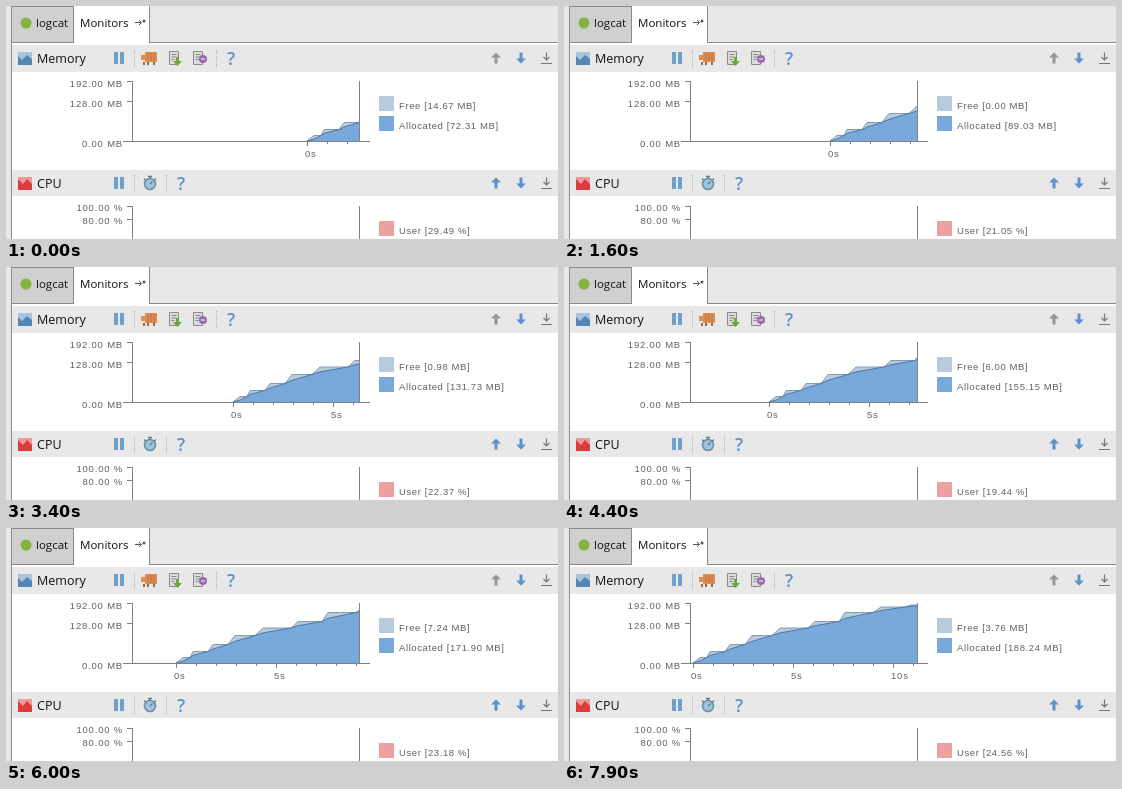
Animation, 552 px wide and 233 px high, one loop 8 s. Source, as an HTML page:

```html
<!DOCTYPE html>
<html lang="en">
<head>
<meta charset="utf-8">
<title>Monitors</title>
<style>
  html, body { margin: 0; width: 100%; height: 100%; overflow: hidden; background: #fff; }
  svg { display: block; width: 552px; height: 233px; }
  .ui { font-family: "Open Sans", "Noto Sans", sans-serif; fill: #111; }
  .tab { font-size: 11.5px; }
  .title { font-size: 12.5px; }
  .small { font: 9.5px "Liberation Sans", Arial, sans-serif; letter-spacing: .8px; fill: #606060; }
  .legend { letter-spacing: .6px; }
  .end { text-anchor: end; }
  .help { font: 600 18px "Open Sans", sans-serif; fill: #5b90c6; text-anchor: middle; }
  .line { stroke: #808080; fill: none; shape-rendering: crispEdges; }
  .divider { stroke: #b0b0b0; stroke-dasharray: 1 1; }
</style>
</head>
<body>
<svg viewBox="0 0 552 233">
  <defs>
    <clipPath id="plot"><rect x="126" y="70" width="227.5" height="66"/></clipPath>
    <g id="pause" fill="#6fa0cb"><rect width="4" height="12"/><rect x="6" width="4" height="12"/></g>
    <path id="arrow" d="M0-5.5L5-.5H1.5V5.5H-1.5V-.5H-5Z"/>
    <path id="save" d="M0-5.5V2M-3-1L0 2L3-1M-5.5 5.5H5.5" fill="none" stroke="#777" stroke-width="1.2"/>
    <g id="sheet"><path d="M0 0H9V13H0Z" fill="#dcdcdc" stroke="#8a8a8a"/><path d="M2 3H7M2 5.5H7M2 8H5" stroke="#888"/></g>
  </defs>

  <rect width="552" height="36" fill="#e8e8e8"/>
  <rect width="5" height="233" fill="#e8e8e8"/>
  <rect x="6" y="1" width="61" height="35" fill="#d0d0d0"/>
  <rect x="68" width="75" height="38" fill="#fff"/>
  <path class="line" d="M5.5 0V233M5 .5H67M5 36.5H67.5V0M143.5 0V36.5H552" style="stroke:#8a8a8a"/>
  <circle cx="20" cy="17" r="5.5" fill="#84b340"/>
  <text class="ui tab" x="30" y="21">logcat</text>
  <text class="ui tab" x="74" y="21">Monitors</text>
  <path d="M129 16.5H135M133 14L135.5 16.5L133 19" fill="none" stroke="#555"/>
  <circle cx="138" cy="15" r="1.5" fill="#555"/>

  <g fill="#e8e8e8"><rect x="6" y="39" width="546" height="27"/><rect x="6" y="164" width="546" height="26"/></g>
  <path class="line divider" d="M128.5 44V62M210.5 44V62M128.5 169V187M160.5 169V187"/>

  <rect x="12" y="46" width="14" height="13" fill="#a9c4dc"/>
  <path d="M12 50L16 54L21 49L26 53V59H12Z" fill="#5486b3"/>
  <rect x="12" y="171" width="14" height="13" fill="#ef9a9a"/>
  <path d="M12 173L17 178L21 173L26 178V184H12Z" fill="#dc3c3c"/>
  <text class="ui title" x="31" y="57">Memory</text>
  <text class="ui title" x="31" y="182">CPU</text>
  <use href="#pause" x="108" y="46"/>
  <use href="#pause" x="108" y="171"/>

  <path d="M135 49H139V46H151V56H139V54H135Z" fill="#df8d50"/>
  <path d="M142 47V55M145 47V55M148 47V55" stroke="#b9713c"/>
  <path d="M138 56V59M142 56V59M148 56V59" stroke="#9a6a45" stroke-width="2"/>
  <use href="#sheet" x="163.5" y="45.5"/>
  <path d="M170 51H173V55H176L171.5 60L167 55H170Z" fill="#69a83c"/>
  <use href="#sheet" x="187.5" y="45.5"/>
  <circle cx="197" cy="53" r="4" fill="#9b69ab"/><path d="M195 53H199" stroke="#fff"/>
  <text class="help" x="225" y="58.5">?</text>
  <text class="help" x="175" y="183.5">?</text>
  <circle cx="144" cy="178" r="5.5" fill="#9cc4de" stroke="#71909f" stroke-width="1.6"/>
  <path d="M142 170.5H146M144 170V173M138 172.5L140 174.5M150 172.5L148 174.5M144 178L146.5 175.5" stroke="#62798a" stroke-width="1.3"/>

  <g fill="#5b92cc">
    <use href="#arrow" x="490" y="52" fill="#969696"/>
    <use href="#arrow" transform="translate(515 52) scale(1 -1)"/>
    <use href="#arrow" x="490" y="177"/>
    <use href="#arrow" transform="translate(515 177) scale(1 -1)"/>
  </g>
  <use href="#save" x="540.5" y="52"/>
  <use href="#save" x="540.5" y="177"/>

  <g class="small end">
    <text x="117" y="81">192.00 MB</text>
    <text x="117" y="101">128.00 MB</text>
    <text x="117" y="141">0.00 MB</text>
    <text x="117" y="205">100.00 %</text>
    <text x="117" y="218">80.00 %</text>
  </g>
  <g clip-path="url(#plot)">
    <g id="series">
      <path id="total" fill="#b8cbdc"/>
      <path id="used" fill="#78a9da"/>
      <path id="totalLine" fill="none" stroke="#7f9bb5"/>
      <path id="usedLine" fill="none" stroke="#4f779f"/>
    </g>
  </g>
  <path class="line" d="M121 75.5H126.5V135M121 95.5H126M117 135.5H364M353.5 75V135M121 200.5H126.5V233M121 213.5H126M353.5 200V233"/>
  <path id="ticks" class="line"/>
  <g id="seconds" class="small"></g>

  <rect x="373" y="90" width="15" height="15" fill="#b8cbdc"/>
  <rect x="373" y="110" width="15" height="15" fill="#78a9da"/>
  <rect x="373" y="215" width="15" height="15" fill="#eca0a0"/>
  <g class="small legend">
    <text id="free" x="393" y="103"></text>
    <text id="allocated" x="393" y="123"></text>
    <text id="user" x="393" y="228"></text>
  </g>
</svg>
<script>
const LOOP = 8000, RIGHT = 353, BASE = 135;
const $ = id => document.getElementById(id);

// Plateaus of the heap: start, end and height in pixels.
const plateaus = [
  [7, 14, 5.5], [17, 32, 11.5], [37, 52, 18.5], [59, 79, 27.5], [87, 115, 35],
  [122, 146, 41.5], [152, 180, 50.5], [188, 212, 56], [218, 230, 58]
];
// Readings: second, free MB, allocated MB.
const memory = [
  [0, 14.67, 72.31], [.8, 0, 89.03], [1.7, 0, 121.57], [2.6, .98, 131.73],
  [3.6, 6, 155.15], [4.5, 0, 163.08], [5.4, 7.24, 171.9], [6.3, 0, 181.87], [7.3, 3.76, 188.24]
];
// Readings: second, user %.
const cpu = [
  [0, 29.49], [.5, 18.36], [1.4, 21.05], [2.3, 18.64], [3.2, 22.37],
  [4.1, 19.44], [5, 24.03], [5.9, 23.18], [6.6, 24.56]
];

const toPath = points => "M" + points.map(([x, h]) => `${x} ${BASE - h}`).join("L");
const drawSeries = (id, points) => {
  const d = toPath(points);
  $(id + "Line").setAttribute("d", d);
  $(id).setAttribute("d", `${d}V${BASE}H0Z`);
};
drawSeries("total", [[0, 0], ...plateaus.flatMap(([a, b, h]) => [[a, h], [b, h]])]);
drawSeries("used", [[0, 0], ...plateaus.flatMap(([a, b, h], i) => {
  const before = i ? plateaus[i - 1][2] : 0;
  return [[a, before + (h - before) * .35], [b, h]];
})]);

const labels = [0, 5, 10].map(second => {
  const text = document.createElementNS("http://www.w3.org/2000/svg", "text");
  text.textContent = second + "s";
  text.setAttribute("y", 151);
  $("seconds").append(text);
  return { second, text };
});

const latest = (rows, t) => rows.filter(row => row[0] <= t + 1e-6).pop();

function render(ms) {
  const t = Math.floor(ms / 100) / 10;
  const origin = Math.round(301 - 21.8 * t);
  $("series").setAttribute("transform", `translate(${origin} 0)`);

  let ticks = "";
  for (let s = 0; origin + s * 20 <= RIGHT; s++)
    ticks += `M${origin + s * 20 + .5} ${BASE}v${s % 5 ? 3 : 5}`;
  $("ticks").setAttribute("d", ticks);
  for (const { second, text } of labels) {
    const x = origin + second * 20;
    text.setAttribute("x", x - 2);
    text.setAttribute("visibility", x <= RIGHT ? "visible" : "hidden");
  }

  const [, free, allocated] = latest(memory, t);
  $("free").textContent = `Free [${free.toFixed(2)} MB]`;
  $("allocated").textContent = `Allocated [${allocated.toFixed(2)} MB]`;
  $("user").textContent = `User [${latest(cpu, t)[1].toFixed(2)} %]`;
}

const start = performance.now();
function tick() {
  render((performance.now() - start) % LOOP);
  requestAnimationFrame(tick);
}
tick();
</script>
</body>
</html>
```
